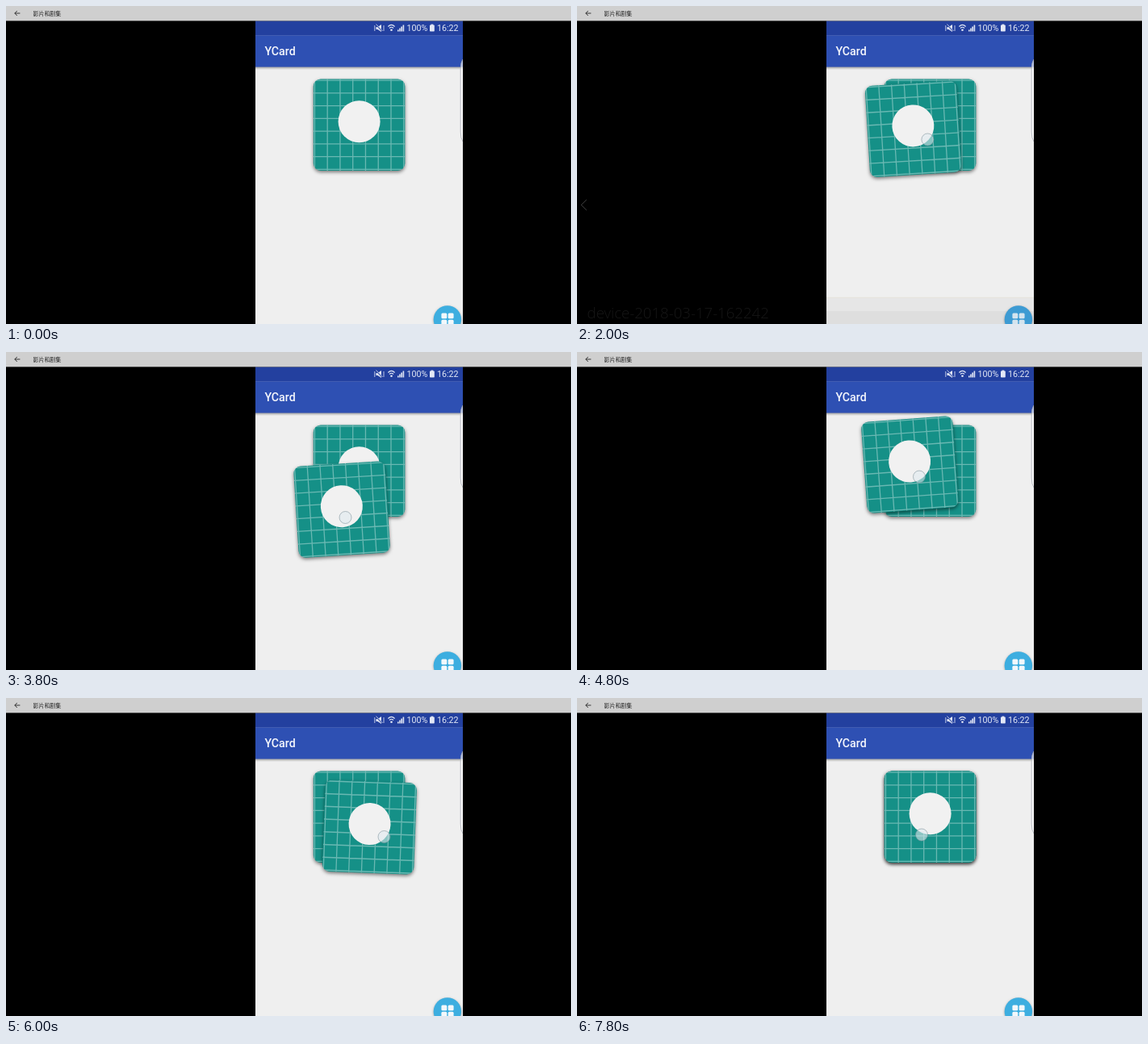
An HTML page with a canvas for the animation above (8 s loop, 700 px wide and 394 px high).

```html
<!DOCTYPE html>
<html lang="zh">
<head>
<meta charset="utf-8">
<title>YCard</title>
<style>
html, body { margin: 0; width: 100%; height: 100%; overflow: hidden; background: #000; }
canvas { display: block; }
</style>
</head>
<body>
<canvas id="stage" width="700" height="394"></canvas>
<script>
const ctx = document.getElementById('stage').getContext('2d');
const LOOP = 8000, STEP = 200;
const HOME = { x: 437.6, y: 147.2 };
const SIZE = 113.5;

// time, card offset x/y, finger x/y
const DRAG = [
  [1600, 0, 0, 455, 160],
  [2800, -81, 20, 375.5, 181],
  [3800, -21.5, 48, 420.5, 205],
  [4800, -25.2, -7.7, 424, 154.5],
  [6000, 12.8, 12.8, 468.5, 172],
  [6200, 3, 3, 458, 162],
  [6400, 0, 0, 455, 159],
  [6800, 0, 0, 427, 169.5],
  [7200, -22, 12, 405, 182],
  [7800, 0, 0, 427, 169.5]
];

const clamp = v => Math.max(0, Math.min(1, v));
const ease = v => v * v * (3 - 2 * v);

function poseAt(t) {
  const last = DRAG.length - 1;
  let i = 0;
  while (i < last - 1 && t >= DRAG[i + 1][0]) i++;
  const a = DRAG[i], b = DRAG[i + 1];
  const k = ease(clamp((t - a[0]) / (b[0] - a[0])));
  const [x, y, fingerX, fingerY] = [1, 2, 3, 4].map(n => a[n] + (b[n] - a[n]) * k);
  return { x, y, fingerX, fingerY };
}

function rect(x, y, w, h, color) {
  ctx.fillStyle = color;
  ctx.fillRect(x, y, w, h);
}

function roundRect(x, y, w, h, r, color) {
  ctx.beginPath();
  ctx.roundRect(x, y, w, h, r);
  ctx.fillStyle = color;
  ctx.fill();
}

function disc(x, y, r, color) {
  ctx.beginPath();
  ctx.arc(x, y, r, 0, Math.PI * 2);
  ctx.fillStyle = color;
  ctx.fill();
}

function path(d, color, width, x = 0, y = 0) {
  ctx.save();
  ctx.translate(x, y);
  ctx.strokeStyle = color;
  ctx.lineWidth = width;
  ctx.stroke(new Path2D(d));
  ctx.restore();
}

function shape(d, color, x = 0, y = 0) {
  ctx.save();
  ctx.translate(x, y);
  ctx.fillStyle = color;
  ctx.fill(new Path2D(d));
  ctx.restore();
}

function text(str, x, y, font, color) {
  ctx.font = font;
  ctx.fillStyle = color;
  ctx.fillText(str, x, y);
}

function shadow(color, blur, y) {
  ctx.shadowColor = color;
  ctx.shadowBlur = blur;
  ctx.shadowOffsetY = y;
}

function drawCard(dx, dy) {
  const half = SIZE / 2;
  ctx.save();
  ctx.translate(HOME.x + dx, HOME.y + dy);
  ctx.rotate(dx / 6 * Math.PI / 180);
  shadow('rgba(0,0,0,.5)', 4, 2);
  roundRect(-half, -half, SIZE, SIZE, 9, '#159087');
  shadow('transparent', 0, 0);
  ctx.save();
  ctx.clip();
  const pitch = SIZE / 7.2;
  ctx.beginPath();
  for (let i = 0; i < 8; i++) {
    const p = (i - 3.5) * pitch;
    ctx.moveTo(p, -half);
    ctx.lineTo(p, half);
    ctx.moveTo(-half, p);
    ctx.lineTo(half, p);
  }
  ctx.strokeStyle = 'rgba(255,255,255,.36)';
  ctx.lineWidth = 1.3;
  ctx.stroke();
  ctx.restore();
  ctx.strokeStyle = 'rgba(8,92,86,.55)';
  ctx.lineWidth = 0.8;
  ctx.stroke(new Path2D());
  disc(0, -4, 26, '#f1f1f1');
  ctx.restore();
}

function drawWindowBar() {
  rect(0, 0, 700, 18.4, '#cfcfcf');
  path('M17.4 9H10.8M13.8 6L10.8 9L13.8 12', '#222', 0.9);
  text('影片和剧集', 33.6, 11.8, '6.9px "Noto Sans CJK SC", "Noto Sans CJK", sans-serif', '#222');
}

function drawStatusBar() {
  const ink = '#e3e8f6';
  rect(309, 18.4, 257, 18, '#23409f');
  path('M456.8 24V31M468 24V31', ink, 0.8);
  shape('M458.5 26H460.5L465 23V32L460.5 29H458.5Z', ink);
  path('M458.5 23L466.5 31.5', '#23409f', 1.6);
  path('M458.5 22.5L466.5 31', ink, 0.8);
  path('M473.4 25.5Q477.5 21.3 481.6 25.5M475 27.5Q477.5 25 480 27.5', ink, 1.1);
  disc(477.5, 29.8, 1.3, ink);
  for (let i = 0; i < 4; i++) rect(485 + i * 2.2, 29.5 - i * 2, 1.6, 2 + i * 2, ink);
  const font = '10.7px Roboto, sans-serif';
  text('100%', 496.6, 31.2, font, ink);
  rect(526.5, 22.6, 2.8, 1.5, ink);
  roundRect(525, 23.6, 5.8, 8, 0.8, ink);
  text('16:22', 534, 31.2, font, ink);
}

function drawAppBar() {
  const fade = ctx.createLinearGradient(0, 75, 0, 79);
  fade.addColorStop(0, 'rgba(0,0,0,.35)');
  fade.addColorStop(1, 'rgba(0,0,0,0)');
  rect(309, 75, 257, 4, fade);
  rect(309, 36.2, 257, 39.3, '#2e50b3');
  text('YCard', 320.4, 61.3, '500 14.2px Roboto, sans-serif', '#f4f6fc');
}

function drawEdgeHandle() {
  const outline = 'M566 66Q563.2 70 563.2 78V156Q563.2 164 566 168';
  shape(outline + 'Z', 'rgba(255,255,255,.65)');
  path(outline, '#a9adb5', 0.8);
}

function drawButton(dimmed) {
  ctx.save();
  shadow('rgba(0,0,0,.35)', 3, 1);
  disc(546.9, 388.4, 17.2, dimmed ? '#3d9bd3' : '#3daee0');
  ctx.restore();
  for (const x of [539.4, 547.7])
    for (const y of [380.4, 388.7])
      roundRect(x, y, 6.9, 6.9, 1.5, dimmed ? '#d4e4ee' : '#f2f8fb');
}

function drawFinger(x, y) {
  disc(x, y, 7.5, 'rgba(225,235,240,.58)');
  ctx.strokeStyle = 'rgba(120,140,150,.6)';
  ctx.lineWidth = 0.9;
  ctx.stroke();
}

function drawControls(alpha) {
  ctx.save();
  ctx.globalAlpha = alpha;
  path('M11.8 240L5.2 246.5L11.8 253', '#858585', 1);
  text('device-2018-03-17-162242', 12.6, 386.5, '300 18.6px "Open Sans", "Noto Sans", sans-serif', '#2c2c2c');
  ctx.restore();
}

function drawPointer(x, y) {
  const d = 'M0 0V8L1.8 6.4L3 9L4.2 8.4L3 5.9H5.2Z';
  shape(d, '#fff', x, y);
  path(d, '#666', 0.7, x, y);
}

function draw(t) {
  const overlay = t >= 1000 && t < 2200 ? (t < 1200 || t >= 2000 ? 0.5 : 1) : 0;
  const pose = poseAt(t);

  rect(0, 0, 700, 394, '#000');
  drawWindowBar();

  ctx.save();
  ctx.beginPath();
  ctx.rect(309, 18.4, 257, 376);
  ctx.clip();
  rect(309, 18.4, 257, 376, '#efefef');
  drawCard(0, 0);
  if (t >= 600) drawCard(pose.x, pose.y);
  if (t >= 1600 && (t < 6400 || t >= 6800)) drawFinger(pose.fingerX, pose.fingerY);
  drawAppBar();
  drawStatusBar();
  drawEdgeHandle();
  if (overlay) {
    ctx.globalAlpha = overlay;
    rect(309, 361, 257, 17, '#dedede');
    rect(309, 360.6, 257, 1.4, '#e7e3d6');
    rect(309, 378, 257, 16, '#cecece');
    ctx.globalAlpha = 1;
  }
  drawButton(overlay > 0);
  ctx.restore();

  if (overlay) drawControls(overlay);
  if (t >= 1000 && t < 2000) drawPointer(446, 78.5);
}

function frame(now) {
  draw(Math.floor((now % LOOP) / STEP) * STEP);
  requestAnimationFrame(frame);
}
requestAnimationFrame(frame);
</script>
</body>
</html>
```
